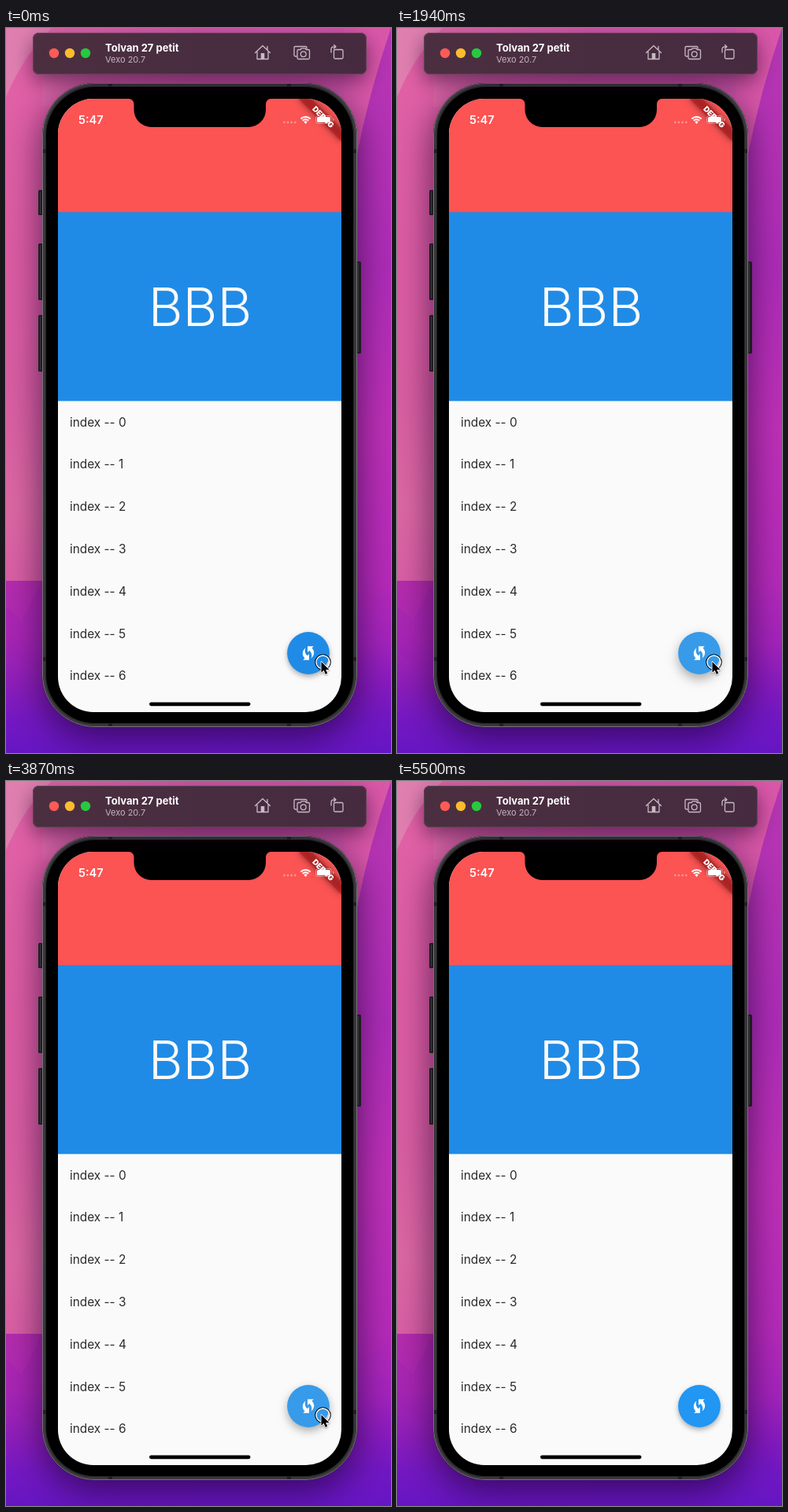
Write an HTML page with a canvas that moves like this. It is 489 px wide and 922 px high and loops after 5.75 s.

```html
<!DOCTYPE html>
<html lang="en">
<head>
<meta charset="utf-8">
<title>Scrolling list demo</title>
<style>
html, body { margin: 0; width: 489px; height: 922px; overflow: hidden; background: #b03aa8; }
canvas { display: block; width: 489px; height: 922px; }
</style>
</head>
<body>
<canvas id="stage"></canvas>
<script>
const W = 489, H = 922, LOOP = 5750, SCALE = 0.96;
const canvas = document.getElementById('stage');
const dpr = window.devicePixelRatio || 1;
canvas.width = W * dpr;
canvas.height = H * dpr;
const ctx = canvas.getContext('2d');
ctx.scale(dpr, dpr);

const FONT = 'Inter, Roboto, sans-serif';
const BLUE = '#208be6', FAB = '#2196f3', PRESSED = '#379bea', FADING = '#2a98ef';
const HOME = [400, 806];

// Each step changes only the listed properties.
const steps = [
  [0, { scroll: 0, click: true, fab: BLUE, lift: 6, ripple: 0, tip: HOME }],
  [150, { click: false }],
  [450, { click: true }],
  [600, { click: false }],
  [1200, { scroll: 144, fab: FADING }],
  [1340, { fab: FAB }],
  [1940, { scroll: 0, click: true, fab: PRESSED, lift: 12 }],
  [2090, { click: false, fab: FAB, lift: 6 }],
  [2680, { scroll: 144, click: true, fab: PRESSED, lift: 9 }],
  [2830, { click: false, fab: FAB, lift: 6 }],
  [3270, { click: true, fab: PRESSED, lift: 9 }],
  [3420, { scroll: 0, click: false, fab: FADING, lift: 6 }],
  [3570, { fab: FAB }],
  [3870, { click: true, fab: PRESSED, lift: 9 }],
  [4020, { scroll: 144, click: false, fab: FADING, lift: 6 }],
  [4170, { fab: FAB }],
  [4470, { scroll: 0, click: true, fab: '#3097ec', lift: 12, ripple: 36 }],
  [4620, { click: false, fab: FAB, lift: 6, ripple: 0, tip: [422, 850] }],
  [4760, { tip: [434, 883] }],
  [4910, { tip: [441, 908] }],
  [5060, { tip: [444, 911] }],
  [5210, { tip: [447, 915] }],
  [5360, { tip: [448, 917] }],
  [5500, { tip: null }]
];

function stateAt(t) {
  const state = {};
  for (const [at, change] of steps) if (at <= t) Object.assign(state, change);
  return state;
}

function rect(x, y, w, h, color) {
  ctx.fillStyle = color;
  ctx.fillRect(x, y, w, h);
}

function roundPath(x, y, w, h, r) {
  ctx.beginPath();
  ctx.roundRect(x, y, w, h, r);
}

function roundFill(x, y, w, h, r, color) {
  roundPath(x, y, w, h, r);
  ctx.fillStyle = color;
  ctx.fill();
}

function disc(x, y, r, color) {
  ctx.beginPath();
  ctx.arc(x, y, r, 0, 7);
  ctx.fillStyle = color;
  ctx.fill();
}

function ring(x, y, r, width, color) {
  ctx.beginPath();
  ctx.arc(x, y, r, 0, 7);
  ctx.lineWidth = width;
  ctx.strokeStyle = color;
  ctx.stroke();
}

function text(str, x, y, size, weight, color, align = 'left') {
  ctx.font = `${weight} ${size}px ${FONT}`;
  ctx.textAlign = align;
  ctx.fillStyle = color;
  ctx.fillText(str, x, y);
}

function shadow(color, blur, dy) {
  ctx.shadowColor = color;
  ctx.shadowBlur = blur * dpr;
  ctx.shadowOffsetY = dy * dpr;
}

function isolated(draw) {
  ctx.save();
  draw();
  ctx.restore();
}

function linear(x0, y0, x1, y1, ...stops) {
  const g = ctx.createLinearGradient(x0, y0, x1, y1);
  stops.forEach(([at, color]) => g.addColorStop(at, color));
  return g;
}

function wallpaper() {
  rect(0, 0, 245, H, linear(0, 0, 0, H, [0, '#e262a6'], [0.3, '#dc5ca2'], [0.5, '#d95ea1'],
    [0.66, '#dc68a3'], [0.762, '#d95fa4'], [0.763, '#b42cac'], [0.84, '#ac28b4'],
    [0.91, '#8a1dba'], [0.95, '#7418c2'], [1, '#6515c2']));
  rect(245, 0, 244, H, linear(0, 0, 0, H, [0, '#b436b0'], [0.17, '#b431b5'], [0.33, '#ac2cb6'],
    [0.55, '#bd30b6'], [0.76, '#b42ab8'], [0.85, '#a223bc'], [0.91, '#841abf'],
    [0.95, '#7017c2'], [1, '#6515c4']));
  rect(46, 0, 400, 100, linear(46, 0, 446, 0, [0, '#df68a8'], [0.5, '#d058a8'], [1, '#d256aa']));

  // Pale hill, upper left
  ctx.beginPath();
  ctx.moveTo(0, 0);
  ctx.lineTo(58, 0);
  ctx.quadraticCurveTo(22, 35, 0, 88);
  ctx.fillStyle = '#df7fb0';
  ctx.fill();

  // Pink ridge, upper right
  ctx.beginPath();
  ctx.moveTo(430, 0);
  ctx.lineTo(489, 0);
  ctx.quadraticCurveTo(461, 82, 445, 165);
  ctx.lineTo(430, 165);
  ctx.fillStyle = '#d957a8';
  ctx.fill();

  // Fold near the lower left edge
  ctx.beginPath();
  ctx.moveTo(0, 735);
  ctx.lineTo(20, 755);
  ctx.lineTo(45, 705);
  ctx.lineTo(60, 830);
  ctx.lineTo(0, 795);
  ctx.fillStyle = 'rgba(150,30,180,.25)';
  ctx.fill();
}

function toolbar() {
  isolated(() => {
    shadow('rgba(30,0,35,.55)', 26, 9);
    roundFill(34, 6, 424, 53, 8, '#472d3f');
  });
  roundFill(34, 6, 424, 53, 8, linear(34, 0, 458, 0, [0, '#4b2f40'], [1, '#462b40']));
  roundPath(34.5, 6.5, 423, 52, 7.5);
  ctx.lineWidth = 1;
  ctx.strokeStyle = '#5f4355';
  ctx.stroke();

  ['#ff5b56', '#fdbb2e', '#28c83f'].forEach((c, i) => disc(61 + i * 20, 32, 6.2, c));
  text('Tolvan 27 petit', 126, 30, 13, 700, '#ffffff');
  text('Vexo 20.7', 126, 44, 11, 400, '#c3b4be');

  ctx.strokeStyle = ctx.fillStyle = '#c9bac4';
  ctx.lineWidth = 1.3;
  ctx.lineJoin = ctx.lineCap = 'round';
  ctx.stroke(new Path2D('M316.5 31.5L326 22.5L335.5 31.5M319 30V39.5H333V30M332 27.5V23.5'));
  ctx.fillRect(323.7, 32, 4.6, 7.5);

  ctx.stroke(new Path2D('M369 36H367.5Q366 36 366 34.5V25Q366 23.5 367.5 23.5H380.5Q382 23.5 382 25V26'));
  ctx.stroke(new Path2D('M371.5 27.5H374L375.3 25.8H380L381.3 27.5H384Q385.5 27.5 385.5 29V38Q385.5 39.5 384 39.5H371.5Q370 39.5 370 38V29Q370 27.5 371.5 27.5Z'));
  ring(377.7, 33.3, 3.4, 1.3, '#c9bac4');

  roundPath(416.5, 27.5, 11.5, 11.5, 1.5);
  ctx.stroke();
  ctx.stroke(new Path2D('M413 31V27Q413 23.8 416.5 23.8H419M416.5 21.5L419 23.8L416.5 26.1'));
}

function phoneBody() {
  isolated(() => {
    shadow('rgba(25,0,45,.68)', 46, 13);
    roundFill(46, 70, 400, 819, 67, '#222');
  });
  const buttons = [[41, 206, 32], [41, 274, 72], [41, 365, 72], [445, 297, 117]];
  buttons.forEach(([x, y, h]) => {
    roundFill(x, y, 6, h, 1.5, '#1d1d1f');
    rect(x + 2, y + 2, 1, h - 4, '#3c3a3e');
  });
  roundFill(46, 70, 400, 819, 67, '#29292b');
  roundPath(46.5, 70.5, 399, 818, 66.5);
  ctx.lineWidth = 1;
  ctx.strokeStyle = '#77757a';
  ctx.stroke();
  roundPath(48.5, 72.5, 395, 814, 64.5);
  ctx.lineWidth = 2;
  ctx.strokeStyle = '#3d3d3f';
  ctx.stroke();

  [[130, 71], [357, 71], [130, 884], [357, 884]].forEach(([x, y]) => rect(x, y, 5, 4, '#202022'));
  [154, 800].forEach(y => [47, 441].forEach(x => rect(x, y, 4, 5, '#202022')));
  roundFill(51, 75, 390, 809, 62, '#000');
}

function page(scroll) {
  rect(66, 90, 360, 780, '#fafafa');
  rect(66, 90 - scroll, 360, 145, '#fc5353');
  rect(66, 234.2 - scroll, 360, 240.2, BLUE);
  text('BBB', 246.5, 379 - scroll, 67.5, 300, '#fafafa', 'center');
  for (let i = 0; i < 10; i++) {
    text('index -- ' + i, 81, 506.7 - scroll + i * 56 * SCALE, 16 * SCALE, 400, '#2b2b2b');
  }
}

function fab({ fab, lift, ripple }) {
  isolated(() => {
    shadow('rgba(0,0,0,.32)', lift * 1.15, lift * 0.5);
    disc(384, 795, 26.9, fab);
  });
  isolated(() => {
    ctx.beginPath();
    ctx.arc(384, 795, 26.9, 0, 7);
    ctx.clip();
    if (ripple) disc(402, 806, ripple, 'rgba(255,255,255,.24)');
    ctx.translate(384 - 12 * SCALE, 795 - 12 * SCALE);
    ctx.scale(SCALE, SCALE);
    ctx.fillStyle = '#fff';
    const arrow = new Path2D('M16.7 5.3L19 3H11V11L13.3 8.7C15.3 10.2 16.5 12.5 16.5 15.1C16.5 16.4 16.2 17.7 15.7 18.8C18 17.2 19.5 14.6 19.5 11.6C19.5 9.1 18.4 6.9 16.7 5.3Z');
    ctx.fill(arrow);
    ctx.translate(24, 24);
    ctx.rotate(Math.PI);
    ctx.fill(arrow);
  });
}

function debugRibbon() {
  isolated(() => {
    ctx.translate(426, 90);
    ctx.rotate(Math.PI / 4);
    ctx.scale(SCALE, SCALE);
    isolated(() => {
      shadow('rgba(0,0,0,.5)', 8, 0);
      // Only the shadow of this off-stage bar is seen.
      ctx.shadowOffsetX = ctx.shadowOffsetY = -2000 * Math.SQRT1_2 * SCALE * dpr;
      rect(1960, 28, 80, 12, '#000');
    });
    rect(-40, 28, 80, 12, 'rgba(183,28,28,.63)');
    text('DEBUG', 0, 37.7, 10.2, 900, '#fff', 'center');
  });
}

function statusBar() {
  text('5:47', 92, 121.5, 14.6, 600, '#fff');
  for (let i = 0; i < 4; i++) disc(353.4 + i * 4.6, 120, 1.4, 'rgba(255,255,255,.36)');

  isolated(() => {
    ctx.lineCap = 'butt';
    ctx.strokeStyle = '#fff';
    ctx.lineWidth = 2;
    [5.2, 8.6].forEach(r => {
      ctx.beginPath();
      ctx.arc(380.5, 121.5, r, -Math.PI * 0.75, -Math.PI * 0.25);
      ctx.stroke();
    });
    ctx.beginPath();
    ctx.moveTo(380.5, 122);
    ctx.arc(380.5, 121.5, 3, -Math.PI * 0.75, -Math.PI * 0.25);
    ctx.fillStyle = '#fff';
    ctx.fill();
  });

  roundPath(393.5, 111.5, 20, 10, 3);
  ctx.lineWidth = 1;
  ctx.strokeStyle = 'rgba(255,255,255,.4)';
  ctx.stroke();
  roundFill(395, 113, 17, 7, 1.8, '#fff');
  roundFill(415, 114.8, 1.5, 3.6, 0.7, 'rgba(255,255,255,.4)');
}

function notch() {
  ctx.fillStyle = '#000';
  ctx.fill(new Path2D('M152 88V90H156A6.500 6.500 0 0 1 162.500 96.500V104A22 22 0 0 0 184.500 126H308A22 22 0 0 0 330 104V96.500A6.500 6.500 0 0 1 336.500 90H340V88Z'));
}

function pointer([x, y]) {
  isolated(() => {
    ctx.translate(x, y);
    ctx.scale(0.95, 0.95);
    const shape = new Path2D('M0.500 0V14.500L3.800 11.400L6 16.500L8.700 15.400L6.500 10.400H11Z');
    ctx.lineJoin = 'round';
    ctx.lineWidth = 1.8;
    ctx.strokeStyle = '#fff';
    isolated(() => {
      shadow('rgba(0,0,0,.35)', 2, 1);
      ctx.stroke(shape);
    });
    ctx.fillStyle = '#000';
    ctx.fill(shape);
  });
}

function draw(state) {
  wallpaper();
  phoneBody();
  toolbar();
  isolated(() => {
    roundPath(66, 90, 360, 780, 45);
    ctx.clip();
    page(state.scroll);
    fab(state);
    debugRibbon();
    statusBar();
    roundFill(182, 857.4, 128.5, 4.8, 2.4, '#000');
  });
  notch();
  if (state.click) {
    ring(402.5, 806.5, 9.7, 1.2, '#000');
    ring(402.5, 806.5, 8.5, 1.3, '#fff');
  }
  if (state.tip) pointer(state.tip);
}

const start = performance.now();
function tick(now) {
  draw(stateAt(Math.max(0, now - start) % LOOP));
  requestAnimationFrame(tick);
}
tick(start);
</script>
</body>
</html>
```
